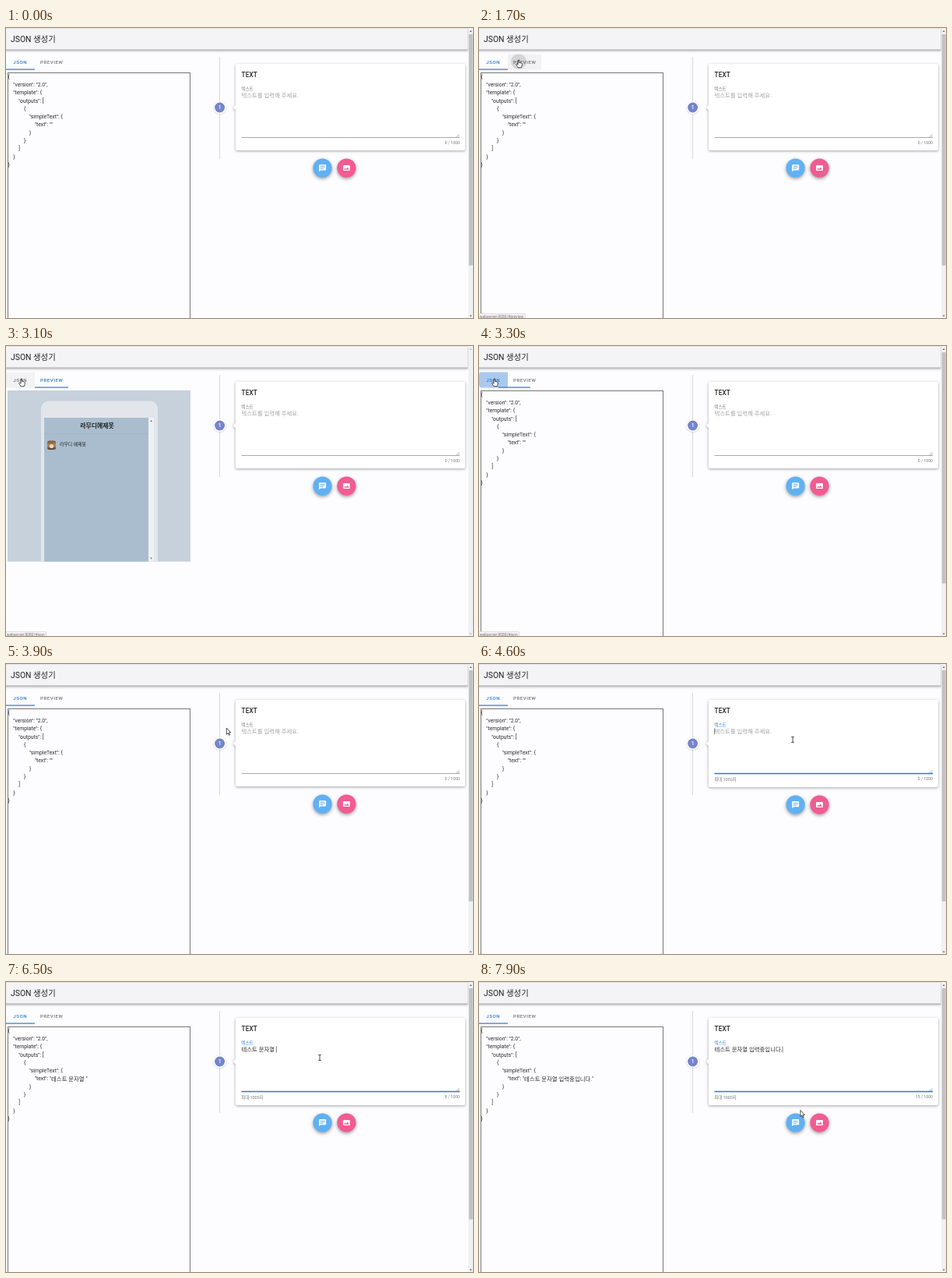
An HTML page with a canvas for the animation above (8000 ms loop, 600 px wide and 372 px high).

```html
<!DOCTYPE html>
<html lang="ko">
<head>
<meta charset="utf-8">
<title>JSON 생성기</title>
<style>
html, body { margin: 0; width: 100%; height: 100%; overflow: hidden; background: #fdfcfe; }
canvas { display: block; width: 600px; height: 372px; }
</style>
</head>
<body>
<canvas id="stage"></canvas>
<script>
const LOOP = 8000, STEP = 100;
const FONT = 'Roboto, "Noto Sans CJK KR", "Noto Sans CJK JP", sans-serif';
const BLUE = '#2a7ad0', GREY = '#757575', INK = '#2b2b2b';
const SHOW_PREVIEW = 1800, SHOW_JSON = 3300, FOCUS = 4300;
const TYPE_START = 5600, KEY_TIME = 57.6, TYPE_END = 7500;
// Each character is one key press; a finished block replaces the one being composed.
const KEYS = 'ㅌ테ㅅ스ㅌ트 ㅁ무문ㅈ자ㅇ여열 ㅇ이입ㄹ려력ㅈ주중ㅇ이입ㄴ니ㄷ다.';
const TABS = [
  { name: 'JSON', x: 0, w: 37, textX: 9.3 },
  { name: 'PREVIEW', x: 37, w: 43, textX: 44 }
];
// Pointer path: time, x, y
const PATH = [
  [100, 425, 361], [300, 330, 250], [600, 110, 80], [800, 56, 44], [900, 56, 43],
  [1100, 70, 16], [1200, 70, 22], [1400, 51, 41], [1700, 51, 41], [1800, 39, 41.5],
  [2200, 22, 43], [2600, 22, 43], [3000, 20, 42], [3400, 20, 42], [3700, 150, 62],
  [4000, 350, 92], [4200, 403, 97], [7500, 403, 97], [7700, 406, 120], [7900, 413, 164.5]
];

const canvas = document.getElementById('stage');
const ctx = canvas.getContext('2d');
const dpr = window.devicePixelRatio || 1;
canvas.width = 600 * dpr;
canvas.height = 372 * dpr;

const clamp = v => Math.max(0, Math.min(1, v));
const easeOut = v => 1 - (1 - v) ** 3;

function rect(x, y, w, h, fill) {
  ctx.fillStyle = fill;
  ctx.fillRect(x, y, w, h);
}

function shape(fill, build) {
  ctx.beginPath();
  build();
  ctx.fillStyle = fill;
  ctx.fill();
}

const circle = (x, y, r, fill) => shape(fill, () => ctx.arc(x, y, r, 0, Math.PI * 2));
const rounded = (x, y, w, h, r, fill) => shape(fill, () => ctx.roundRect(x, y, w, h, r));

function polygon(points, fill) {
  shape(fill, () => points.forEach(([x, y]) => ctx.lineTo(x, y)));
}

function line(points, color, width) {
  ctx.beginPath();
  points.forEach(([x, y]) => ctx.lineTo(x, y));
  ctx.strokeStyle = color;
  ctx.lineWidth = width;
  ctx.stroke();
}

function withShadow(alpha, blur, dy, draw) {
  ctx.save();
  ctx.shadowColor = `rgba(0,0,0,${alpha})`;
  ctx.shadowBlur = blur * dpr;
  ctx.shadowOffsetY = dy * dpr;
  draw();
  ctx.restore();
}

// Draws vertically centred on capital height and returns the end position.
function text(str, x, y, size, color, { weight = 400, align = 'left', spacing = 0 } = {}) {
  ctx.font = `${weight} ${size}px ${FONT}`;
  ctx.textAlign = align;
  ctx.letterSpacing = spacing + 'px';
  ctx.fillStyle = color;
  ctx.fillText(str, x, y + size * 0.36);
  const width = ctx.measureText(str).width;
  ctx.letterSpacing = '0px';
  return x + width;
}

function pointerAt(t) {
  if (t < PATH[0][0]) return null;
  const i = PATH.findIndex(p => p[0] > t);
  if (i < 0) return { x: PATH.at(-1)[1], y: PATH.at(-1)[2] };
  const [t0, x0, y0] = PATH[i - 1], [t1, x1, y1] = PATH[i];
  const k = (t - t0) / (t1 - t0);
  return { x: x0 + (x1 - x0) * k, y: y0 + (y1 - y0) * k };
}

function typedText(t) {
  if (t < TYPE_START) return '';
  const count = Math.floor((t - TYPE_START) / KEY_TIME) + 1;
  let out = '';
  for (const key of KEYS.slice(0, count)) {
    out = (key >= '가' && key <= '힣' ? out.slice(0, -1) : out) + key;
  }
  return out;
}

function drawHeader() {
  withShadow(0.4, 3, 1, () => rect(-5, 0, 598.5, 27.5, '#f4f3f5'));
  rect(0, 0, 594, 1, '#e2e1e4');
  text('JSON 생성기', 6, 14, 10.4, '#222');
}

function drawScrollbar(scrollable) {
  rect(594, 0, 6, 372, '#f1f0f2');
  const arrow = scrollable ? '#666' : '#b5b5b5';
  if (scrollable) rect(594.7, 8, 5, 296.5, '#c1c0c2');
  polygon([[595.6, 5], [598.6, 5], [597.1, 3]], arrow);
  polygon([[595.6, 368.5], [598.6, 368.5], [597.1, 370.5]], arrow);
}

function drawRipple(tab, x, start, t) {
  const age = t - start;
  if (age < 0 || age > 600) return;
  const alpha = 1 - clamp((age - 250) / 350);
  const active = start < 2000 ? t >= SHOW_PREVIEW : t >= SHOW_JSON;
  ctx.save();
  ctx.beginPath();
  ctx.rect(tab.x, 33.5, tab.w, 20);
  ctx.clip();
  circle(x, 43, age * 0.2, active ? `rgba(42,122,208,${0.34 * alpha})` : `rgba(0,0,0,${0.12 * alpha})`);
  ctx.restore();
}

function drawTabs(t, preview, hover) {
  TABS.forEach((tab, i) => {
    const active = (i === 1) === preview;
    if (tab === hover) {
      rect(tab.x, 33.5, tab.w, 20, active ? 'rgba(42,122,208,.08)' : 'rgba(0,0,0,.045)');
    }
    text(tab.name, tab.textX, 43.5, 6.1, active ? BLUE : GREY, { weight: 500, spacing: 0.55 });
  });
  drawRipple(TABS[1], 51, 1650, t);
  drawRipple(TABS[0], 19, 3200, t);
  const shift = clamp((t - 1711) / 100) - clamp((t - 3267) / 100);
  rect(37 * shift, 52.5, 37 + 6 * shift, 1.2, BLUE);
}

function drawJson(value) {
  ctx.strokeStyle = '#777';
  ctx.lineWidth = 1;
  ctx.strokeRect(2.5, 57.5, 234, 330);
  const lines = [
    [0, '{'], [1, '"version": "2.0",'], [1, '"template": {'], [2, '"outputs": ['],
    [3, '{'], [4, '"simpleText": {'], [5, '"text": "'], [4, '}'], [3, '}'], [2, ']'], [1, '}'], [0, '}']
  ];
  lines.forEach(([depth, str], i) => {
    const y = 62.2 + i * 10.3;
    let x = text(str, 2.4 + depth * 6.87, y, 6.8, INK);
    if (depth === 5) {
      if (value) x = text(value, x, y, 7.4, INK);
      text('"', x, y, 6.8, INK);
    }
  });
}

function drawPreview() {
  rect(2, 57, 235, 219.5, '#c6d1dc');
  rounded(45, 70.5, 150, 206, [10, 10, 0, 0], '#e2e6eb');
  rect(49, 92, 134, 184.5, '#a9bdce');
  rect(49, 112, 134, 0.6, '#9fb3c4');
  rect(183, 92, 7, 184.5, '#eef0f2');
  polygon([[185, 97], [188, 97], [186.5, 95]], '#777');
  polygon([[185, 271.5], [188, 271.5], [186.5, 273.5]], '#777');
  text('라무디예제봇', 117, 102, 7.9, '#222', { weight: 700, align: 'center' });
  const fur = ctx.createLinearGradient(0, 121, 0, 133);
  fur.addColorStop(0, '#6f5238');
  fur.addColorStop(0.55, '#c08a55');
  fur.addColorStop(1, '#4a3a30');
  rounded(53, 121.5, 11, 11.5, 2.5, fur);
  circle(58.5, 128.5, 2.6, '#e6d6c2');
  text('라무디 예제봇', 69, 126, 5.9, '#222');
}

function drawTimeline() {
  rect(274, 37, 1, 131, '#d9d8db');
  withShadow(0.2, 2, 0.5, () => circle(274.6, 102, 8, '#fff'));
  circle(274.6, 102, 6.5, '#7585c9');
  text('1', 274.6, 102, 6.8, '#fff', { weight: 500, align: 'center' });
}

function drawField(t, value) {
  const focused = t >= FOCUS;
  const progress = easeOut(clamp((t - FOCUS + 50) / 350));
  const bottom = focused ? 158 : 157;
  withShadow(0.36, 3.5, 1, () => {
    polygon([[295.5, 98], [292, 102], [295.5, 106]], '#fff');
    rounded(295, 46, 295, bottom - 46, 2, '#fff');
  });
  polygon([[296, 97.5], [292, 102], [296, 106.5]], '#fff');
  text('TEXT', 302.5, 60.5, 8.3, '#222', { weight: 500, spacing: 0.1 });
  text('텍스트', 302.3, 78, 5.6, focused ? BLUE : GREY);
  const end = value
    ? text(value, 302.5, 86.5, 7.4, INK)
    : text('텍스트를 입력해 주세요.', 302.5, 86.5, 7.4, '#a2a2a2') * 0 + 302.5;

  const typing = t >= TYPE_START && t < TYPE_END + 500;
  if (focused && (typing || (t - FOCUS - 100) % 1000 < 500)) rect(end, 82.5, 0.6, 8, INK);

  line([[578.5, 140], [582.5, 136]], '#888', 0.6);
  line([[580.7, 140], [582.7, 138]], '#888', 0.6);
  rect(302.5, 140, 280.5, 0.8, '#949494');
  if (focused) {
    const half = 140.25 * progress;
    rect(442.75 - half, 139.8, half * 2, 1.5, BLUE);
    ctx.globalAlpha = progress;
    text('최대 1000자', 302.3, 148, 5.4, GREY);
    ctx.globalAlpha = 1;
  }
  text(`${value.length} / 1000`, 583, 147.2, 5.2, GREY, { align: 'right' });
}

function drawButtons(y) {
  const button = (x, color) => withShadow(0.38, 4, 1.8, () => circle(x, y, 12.1, color));
  button(406.6, '#60b1f3');
  rounded(402.2, y - 4.4, 9, 7.2, 0.9, '#fff');
  polygon([[402.2, y + 1], [402.2, y + 4.8], [405, y + 2]], '#fff');
  [[-2.9, 6], [-1.2, 6], [0.6, 4]].forEach(([dy, w]) => rect(403.7, y + dy, w, 0.8, '#60b1f3'));

  button(437.5, '#f15c92');
  rounded(433.1, y - 3.5, 8.8, 7, 0.9, '#fff');
  polygon([[434.2, y + 2.2], [435.8, y], [437, y + 1.3], [438.7, y - 0.9], [440.9, y + 2.2]], '#f15c92');
}

function drawStatus(tab) {
  const address = 'webserver:8080/#' + tab.name.toLowerCase();
  const width = tab === TABS[1] ? 60 : 52;
  rounded(-2, 366, width + 2, 9, 1.5, '#cfced1');
  rounded(-2, 366.6, width + 1.4, 9, 1.2, '#f3f2f4');
  text(address, 0.8, 370, 4.9, '#777');
}

function outlined(points) {
  ctx.beginPath();
  points.forEach(([x, y]) => ctx.lineTo(x, y));
  ctx.closePath();
  ctx.lineJoin = 'round';
  ctx.fillStyle = '#fff';
  ctx.fill();
  ctx.strokeStyle = '#222';
  ctx.lineWidth = 0.8;
  ctx.stroke();
}

function drawPointer({ x, y }, hover) {
  ctx.save();
  ctx.translate(x, y);
  const overField = x > 302 && x < 583 && y > 82 && y < 140;
  if (hover) {
    outlined([
      [-0.8, 0], [0.5, 0], [0.7, 3.4], [2.2, 3.6], [3.7, 4.2], [4.3, 5], [4.2, 7.2],
      [3.3, 9.8], [-0.9, 9.8], [-2.3, 7.6], [-3.4, 5.6], [-2.4, 5], [-1, 6.2]
    ]);
  } else if (overField) {
    rect(-0.4, -3.4, 0.9, 6.8, '#333');
    rect(-1.8, -3.8, 3.7, 0.8, '#333');
    rect(-1.8, 3, 3.7, 0.8, '#333');
  } else {
    outlined([[0, 0], [0, 8.2], [1.8, 6.6], [3, 9.4], [4.2, 8.9], [3, 6.1], [5.5, 6]]);
  }
  ctx.restore();
}

function draw(t) {
  ctx.setTransform(dpr, 0, 0, dpr, 0, 0);
  rect(0, 0, 600, 372, '#fdfcfe');
  const preview = t >= SHOW_PREVIEW && t < SHOW_JSON;
  const pointer = pointerAt(t);
  const hover = pointer && pointer.y > 33 && pointer.y < 54
    ? TABS.find(tab => pointer.x >= tab.x && pointer.x < tab.x + tab.w)
    : null;
  const value = typedText(t);

  drawHeader();
  drawTabs(t, preview, hover);
  if (preview) drawPreview();
  else drawJson(value);
  drawTimeline();
  drawField(t, value);
  drawButtons(t >= FOCUS ? 180.5 : 179.6);
  drawScrollbar(!preview);
  if (hover) drawStatus(hover);
  if (pointer) drawPointer(pointer, hover);
}

function tick() {
  const t = performance.now() % LOOP;
  draw(Math.floor(t / STEP) * STEP);
  requestAnimationFrame(tick);
}
tick();
</script>
</body>
</html>
```
